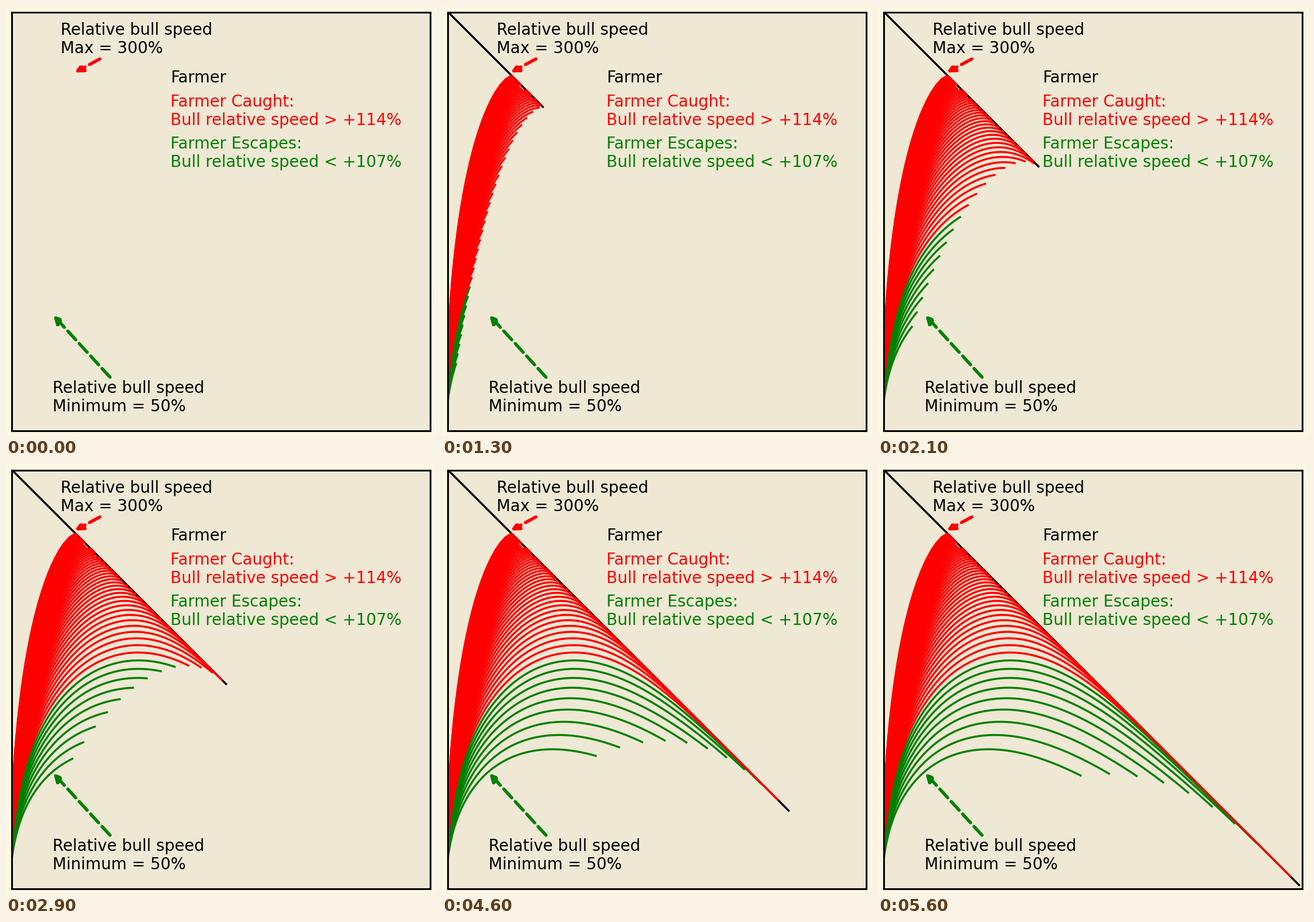
Recreate the animation shown at these times as a matplotlib script. Size 748 by 748 pixels, loop 5.7 s.

```python
import matplotlib.pyplot as plt
import numpy as np
from matplotlib.animation import FuncAnimation

STAGE, SIDE = 748, 728            # pixels: the stage and the framed square
LEFT, TOP = 10.4, 10.6
UNIT, ORIGIN = 732.8, 7.1         # pixels per data unit, pixel of the farmer's start
DT, TOL, SKIP = 0.005, 0.01, 5
LW = 2.5

plt.rcParams["font.family"] = "DejaVu Sans"
plt.rcParams["font.size"] = 19.95

# The farmer runs down the diagonal at unit speed.
time = np.arange(0, np.sqrt(2), DT)
farmer = np.column_stack([time, -time]) / np.sqrt(2) + [0, 1]


def chase(speed):
    """Path of a bull always heading for the farmer, and whether it gets there."""
    bull = np.zeros(2)
    path = [bull]
    for target in farmer[1:]:
        gap = target - bull
        dist = np.hypot(*gap)
        if dist < TOL:
            return np.array(path), True
        bull = bull + gap / dist * min(speed * DT, dist)
        path.append(bull)
    return np.array(path), False


fig = plt.figure(figsize=(STAGE / 100, STAGE / 100), dpi=100, facecolor="#fdf6e3")
bottom = STAGE - TOP - SIDE
ax = fig.add_axes([LEFT / STAGE, bottom / STAGE, SIDE / STAGE, SIDE / STAGE],
                  facecolor="#eee8d5")
x0, y1 = (LEFT - ORIGIN) / UNIT, 1 - (TOP - ORIGIN) / UNIT
ax.set(xlim=(x0, x0 + SIDE / UNIT), ylim=(y1 - SIDE / UNIT, y1), xticks=[], yticks=[])
for spine in ax.spines.values():
    spine.set(linewidth=2.2, color="black")


def label(text, x, y, color="black", tip=None, arrow=None):
    """Text with its last baseline y pixels from the top, optionally with an arrow."""
    props = tip and dict(arrowstyle="-|>", color=arrow, lw=4, ls="--")
    ax.annotate(text, xy=tip or (0.5, 0.5), xytext=(x, STAGE - y),
                textcoords="figure pixels", color=color, arrowprops=props)


label("Relative bull speed\nMax = 300%", 95, 82, tip=(0.15, 0.85), arrow="red")
label("Relative bull speed\nMinimum = 50%", 81, 705, tip=(0.1, 0.2785), arrow="green")
label("Farmer", 286, 133)
label("Farmer Caught:\nBull relative speed > +114%", 286, 207, "red")
label("Farmer Escapes:\nBull relative speed < +107%", 286, 280, "green")

paths, lines = [farmer], ax.plot([], [], color="black", lw=LW)
for speed in np.linspace(0.5, 4, 50):
    path, caught = chase(speed)
    paths.append(path)
    lines += ax.plot([], [], color="red" if caught else "green", lw=LW)


def update(frame):
    end = SKIP * frame + 1 if frame else 0
    for line, path in zip(lines, paths):
        line.set_data(path[:end, 0], path[:end, 1])
    return lines


anim = FuncAnimation(fig, update, frames=57, interval=100, repeat=True, repeat_delay=0)
plt.show()
```
